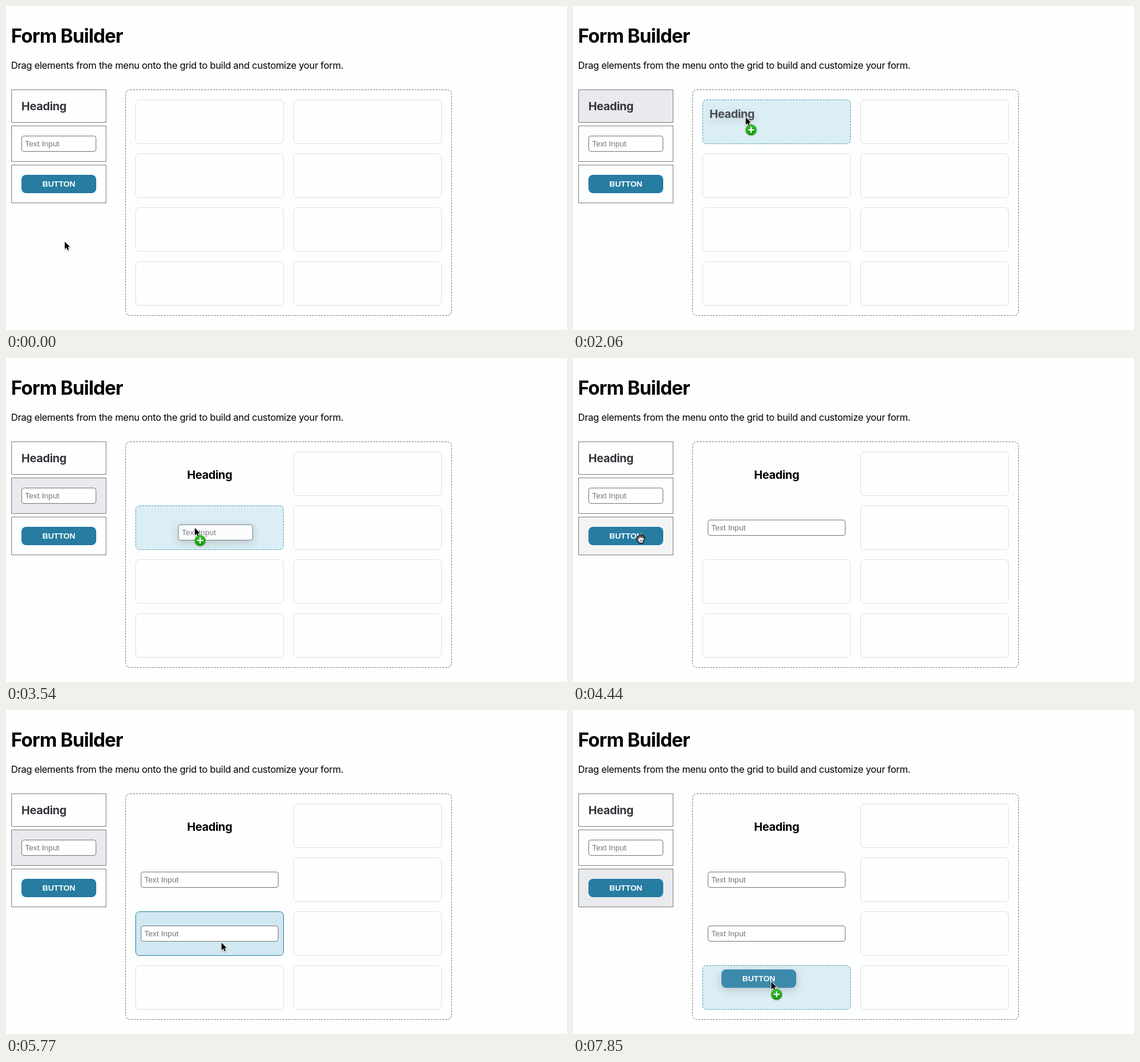
These frames come from a looping animation (945x547 px, 8000 ms). An HTML page:

```html
<!DOCTYPE html>
<html lang="en">
<head>
<meta charset="utf-8">
<title>Form Builder</title>
<style>
  * { box-sizing: border-box; }
  html, body { margin: 0; width: 100%; height: 100%; overflow: hidden; }
  body {
    position: relative; background: #fdfefe; color: #000;
    font-family: Inter, "Noto Sans", sans-serif; font-optical-sizing: none;
  }
  h1, p, .item, .grid, .ghost, .pointer { position: absolute; margin: 0; }
  h1 { left: 8.5px; top: 31px; font-size: 32px; font-weight: 700; line-height: 40px; letter-spacing: -.026em; white-space: nowrap; }
  p { left: 8.5px; top: 90px; font-size: 16px; line-height: 20px; letter-spacing: -.02em; white-space: nowrap; }

  .item { left: 9px; width: 160px; padding: 16px; border: 1px solid #808080; }
  .heading { height: 22px; font-size: 19.2px; font-weight: 700; line-height: 22px; letter-spacing: -.02em; white-space: nowrap; color: #37383d; }
  .input, .button { font-family: "Liberation Sans", Arial, sans-serif; font-size: 13.333px; }
  .input { height: 27px; padding-left: 5px; border: 1px solid #767676; border-radius: 4px; background: #fff; color: #757575; line-height: 25px; }
  .button { height: 31px; border-radius: 8px; background: #277da1; color: #fff; font-weight: 700; line-height: 31px; text-align: center; }

  .grid {
    left: 201px; top: 141px; width: 550px; height: 382px; padding: 16px;
    display: grid; grid: repeat(4, 75px) / repeat(2, 250px); grid-auto-flow: column; gap: 16px;
    border: 1px dashed #777; border-radius: 8px;
  }
  .cell {
    padding: 0 8px; border: 1px solid #dedfe5; border-radius: 7px;
    display: flex; align-items: center; justify-content: center;
  }
  .cell .heading { color: #000; transform: translateY(.5px); }
  .cell .input { width: 232px; }

  .ghost { left: 0; top: 0; width: 126px; opacity: .88; filter: drop-shadow(0 4px 8px rgb(0 0 0 / .2)); }
  .pointer { left: 0; top: 0; overflow: visible; filter: drop-shadow(0 1px 1px rgb(0 0 0 / .3)); }
</style>
</head>
<body>
<h1>Form Builder</h1>
<p>Drag elements from the menu onto the grid to build and customize your form.</p>

<div class="item" style="top:141px;height:56px"><div class="heading">Heading</div></div>
<div class="item" style="top:202px;height:61px"><div class="input">Text Input</div></div>
<div class="item" style="top:268px;height:65px"><div class="button">BUTTON</div></div>

<div class="grid"></div>
<div class="ghost"></div>

<svg class="pointer" width="1" height="1">
  <defs>
    <linearGradient id="green" x2="0" y2="1">
      <stop offset="0" stop-color="#42bd35"/><stop offset="1" stop-color="#109a08"/>
    </linearGradient>
  </defs>
  <path id="arrow" d="M1 1V13.4L3.9 10.8 5.9 15.3 8 14.4 6.1 10 9.8 9.7Z" stroke="#fff" stroke-width="1.8" paint-order="stroke"/>
  <g id="hand" transform="translate(-8 -8)" fill="#fff" stroke="#000" stroke-width="1.1" stroke-linejoin="round">
    <path d="M4.2 9.2 2.6 5.4C2 4 3.7 3.3 4.4 4.6L5.6 7 4.9 2.9C4.7 1.3 6.6 1 6.9 2.5L7.6 6.2 7.8 1.8C7.9 .4 9.7 .5 9.7 1.9V6.3L10.9 2.8C11.4 1.5 13 2 12.7 3.4L11.9 7.4 13.4 5.5C14.3 4.5 15.6 5.4 14.9 6.6 13.8 8.7 13.5 10.6 12.5 12.2L12.1 15.4H5.8C5.2 13.2 3.5 11.8 1.5 9.5 .6 8.2 2 7.1 3.2 8.1Z"/>
    <path d="M7.3 10.2V12.8M9 10.2V12.8M10.7 10.2V12.8" fill="none" stroke-width=".8"/>
  </g>
  <g id="plus" transform="translate(10 22)">
    <circle r="9.3" fill="url(#green)"/>
    <path d="M-5 0H5M0-5V5" stroke="#fff" stroke-width="2.2"/>
  </g>
</svg>

<script>
// The picture advances in even steps; all stop times below count steps.
const LOOP = 8000, STEP = 148, OFFSET = 136, LAST = 52;

// Where the pointer rests; after a "take" it carries the item to the next stop.
const stops = [
  { at: 0, until: 5, x: 98, y: 397 },
  { at: 9, until: 10, x: 86, y: 174, item: 'heading', take: true },
  { at: 13, until: 15, x: 290, y: 187 },
  { at: 18, until: 18, x: 120, y: 164 },
  { at: 20, until: 20, x: 53, y: 224, item: 'input', take: true },
  { at: 23, until: 24, x: 317, y: 286 },
  { at: 29, until: 30, x: 114, y: 305, item: 'button' },
  { at: 34, until: 35, x: 65, y: 232, item: 'input', take: true },
  { at: 37, until: 38, x: 362, y: 392 },
  { at: 45, until: 46.9, x: 108, y: 320, item: 'button' },
  { at: 47, until: 47, x: 109, y: 305, item: 'button', take: true },
  { at: LAST, until: LAST + 1, x: 333, y: 458 }
];

const $ = s => document.querySelector(s);
const clamp = k => Math.max(0, Math.min(1, k));
const smooth = k => k * k * (3 - 2 * k);
const show = (el, on) => { el.style.display = on ? '' : 'none'; };
const inside = (r, x, y) => x >= r.left && x < r.right && y >= r.top && y < r.bottom;

const grid = $('.grid'), ghost = $('.ghost'), pointer = $('.pointer');
grid.innerHTML = '<div class="cell"></div>'.repeat(8);
const cells = [...grid.children];

const menu = [...document.querySelectorAll('.item')].map(el => {
  const part = el.firstElementChild;
  return { el, kind: part.className, html: part.outerHTML, box: el.getBoundingClientRect(), home: part.getBoundingClientRect() };
});

// Each carried item fills the next cell down the first column.
const drags = stops.flatMap((from, i) => from.take ? [{ from, to: stops[i + 1] }] : []);
drags.forEach((d, i) => {
  d.cell = cells[i];
  d.box = d.cell.getBoundingClientRect();
  d.source = menu.find(m => m.kind === d.from.item);
  d.drop = d.to.at + 1;
});

// Rises over two steps from "on", falls over two steps from "off"
const fade = (n, on, off) => Math.min(clamp((n - on) / 2), clamp(1 - (n - off) / 2));

function pointAt(n) {
  const i = stops.findLastIndex(s => s.at <= n);
  const a = stops[i], b = stops[i + 1] || a;
  const k = n > a.until ? smooth((n - a.until) / (b.at - a.until)) : 0;
  return [a.x + (b.x - a.x) * k, a.y + (b.y - a.y) * k];
}

function menuGlow(kind, n) {
  return Math.max(...stops.map((s, i) => s.item === kind
    ? fade(n, s.at - 1, s.take ? stops[i + 1].until : s.until) : 0));
}

function fill(el, html) {
  if (el.dataset.html === html) return;
  el.dataset.html = html;
  el.innerHTML = html;
}

function place(el, x, y) {
  el.style.transform = `translate(${Math.round(x)}px, ${Math.round(y)}px)`;
}

function draw(n) {
  const [x, y] = pointAt(n);

  for (const m of menu) m.el.style.background = `rgb(233 234 238 / ${menuGlow(m.kind, n)})`;

  for (const d of drags) {
    const glow = fade(n, d.to.at - 1.5, d.to.until);
    const full = n >= d.drop, style = d.cell.style;
    fill(d.cell, full ? d.source.html : '');
    style.background = `rgb(209 232 242 / ${glow})`;
    style.borderStyle = !full && glow ? 'dashed' : 'solid';
    style.borderColor = full || glow ? `rgb(39 125 161 / ${glow})` : '';
  }

  const drag = drags.find(d => n >= d.from.until && n < d.drop);
  show(ghost, drag);
  if (drag) {
    const { from, source } = drag;
    fill(ghost, source.html);
    place(ghost, source.home.left + x - from.x, source.home.top + y - from.y);
  }

  const hand = !drag && menu.some(m => inside(m.box, x, y));
  show($('#hand'), hand);
  show($('#arrow'), !hand);
  show($('#plus'), drag && inside(drag.box, x, y));
  place(pointer, x, y);
}

const start = performance.now();
function frame() {
  const t = (performance.now() - start) % LOOP;
  draw(Math.max(0, Math.min(LAST, Math.floor((t - OFFSET) / STEP))));
  requestAnimationFrame(frame);
}
frame();
</script>
</body>
</html>
```
